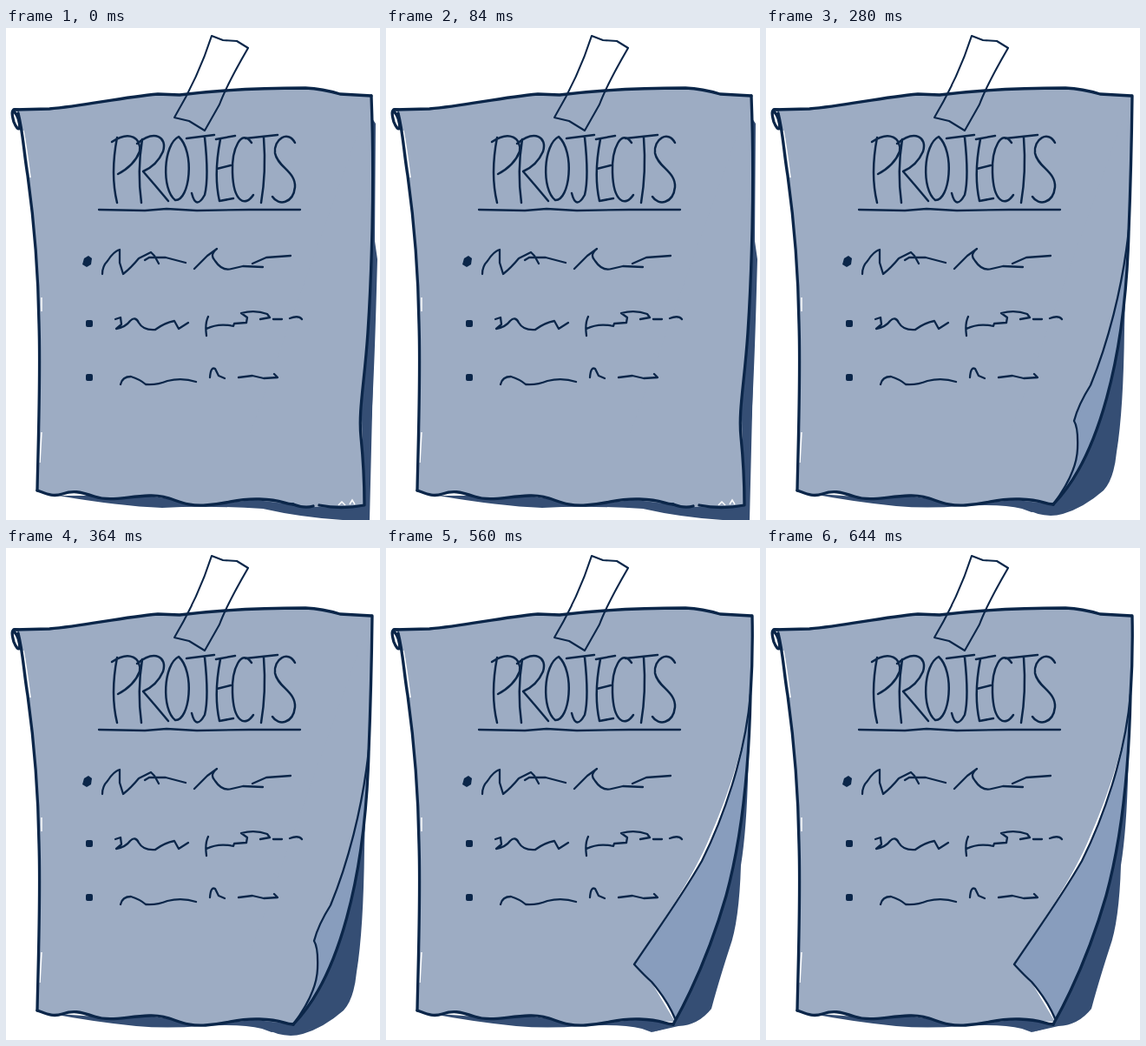
Write an HTML page without scripts that moves like this. It is 431 px wide and 566 px high and loops after 700 ms.

```html
<!DOCTYPE html>
<html lang="en">
<head>
<meta charset="utf-8">
<title>Project note</title>
<style>
  html, body { margin: 0; width: 100%; height: 100%; overflow: hidden; background: #fff; }
  svg { display: block; width: 100%; height: 100%; }
  .ink, .pen, .tape { fill: none; stroke: #0b2649; stroke-linecap: round; stroke-linejoin: round; }
  .ink { stroke-width: 3.3; }
  .pen { stroke-width: 2.3; }
  .tape { stroke-width: 2.1; }
  .letters { stroke-width: 2.5; }
  .dot { fill: #0b2649; }
  .paper { fill: #9dacc3; }
  .shadow { fill: #354e74; }
  .flap { fill: #889dbd; }
  .gap { fill: none; stroke: #fff; stroke-width: 1.5; }
  .pose { visibility: hidden; animation: show 700ms step-end infinite; animation-delay: calc(var(--i) * 140ms - 700ms); }
  @keyframes show { 0% { visibility: visible; } 20%, 100% { visibility: hidden; } }
</style>
</head>
<body>
<svg viewBox="0 0 431 566" role="img" aria-label="A taped note titled Projects, its corner lifting">
  <defs>
    <path id="sheet" class="paper" d="M10 93H50C90 90 130 80 175 76L200 77C240 72 290 69 345 69Q365 70 385 76L421 78V165C413 230 398 275 370 340C345 395 312 438 286 479L305 498L333 545L292 543C270 541 255 546 230 549C200 551 190 538 165 538S122 543 102 539S78 532 65 537S45 535 36 532C36 480 41 400 39 340C38 260 29 205 23 155Q20 122 14 98Z"/>
    <g id="edges">
      <path class="gap" d="M20 118Q24 140 28 172M41 310V326M41 465L39 500"/>
      <path class="ink" d="M9 94L50 93C90 90 130 80 175 76L200 77C240 72 290 69 345 69Q365 70 385 76L421 78"/>
      <path class="ink" d="M14 98C20 122 20 140 25 170C32 220 37 270 38 340C40 400 37 480 36 532"/>
      <path class="ink" d="M14 94C6 92 6 97 9 108Q13 118 16 115Q15 102 10 97"/>
      <path class="ink" d="M36 532C45 535 53 540 65 536S84 533 102 539S138 539 165 538S200 551 230 549S264 541 292 542S318 547 331 548"/>
    </g>
    <path id="under" class="shadow" d="M48 535Q100 545 150 550Q185 553 225 550Q270 547 295 553L306 557L340 548L292 542L230 549L165 538L102 539Z"/>
    <path id="side" class="shadow" d="M422 104L426 110L425 245L428 266C426 340 424 410 420 470L411 475L408 400L418 290Z"/>
  </defs>

  <g class="pose" style="--i:0">
    <use href="#side"/>
    <path class="shadow" d="M409 380L423 400L419 566H388Q340 563 296 553Q230 549 180 552Q130 550 60 538L165 538L230 549L292 542L345 551L412 549Z"/>
    <use href="#sheet"/>
    <path class="paper" d="M421 78C425 180 421 290 417 350S407 440 409 470S413 520 413 549L380 552L345 550L280 542V470Z"/>
    <path class="gap" d="M383 549L387 545L391 549M396 548L399 543L402 548"/>
    <use href="#edges"/>
    <path class="ink" d="M421 78C425 180 421 290 417 350S406 440 409 470S413 520 413 549Q386 554 361 549M331 548Q344 553 354 550"/>
  </g>

  <g class="pose" style="--i:1">
    <use href="#side"/>
    <path class="shadow" d="M405 430L422 400L411 566H385Q340 563 296 553Q230 549 180 552Q130 550 60 538L165 538L230 549L292 542L345 550L403 545Z"/>
    <use href="#sheet"/>
    <path class="paper" d="M421 78C426 180 422 280 416 350S405 490 403 545Q365 551 331 547L280 542V470Z"/>
    <path class="gap" d="M414 350L408 425M350 547L385 544"/>
    <use href="#edges"/>
    <path class="ink" d="M421 78C426 180 422 280 416 350S405 490 403 545Q365 552 331 547"/>
  </g>

  <g class="pose" style="--i:2">
    <use href="#under"/>
    <path class="shadow" d="M416 240L413 345Q412 440 404 488Q401 519 389 532Q366 552 342 559Q320 565 297 552L331 548Q390 440 416 240Z"/>
    <use href="#sheet"/>
    <path class="paper" d="M421 78Q421 160 418 235C414 380 383 495 331 548L280 542V470Z"/>
    <path class="flap" d="M418 232C411 300 393 365 374 411Q360 433 355 452Q360 460 359 484Q358 512 331 548C383 495 414 380 418 235Z"/>
    <use href="#edges"/>
    <path class="ink" d="M422 78Q421 160 418 235C414 380 383 495 331 548"/>
    <path class="pen" d="M418 232C411 300 393 365 374 411Q360 433 355 452Q360 460 359 484Q358 512 331 548"/>
  </g>

  <g class="pose" style="--i:3">
    <use href="#under"/>
    <path class="shadow" d="M417 240Q417 320 411 365Q410 445 400 487Q388 523 361 546Q335 555 306 558L333 548Q396 420 417 240Z"/>
    <use href="#sheet"/>
    <path class="paper" d="M421 78Q421 160 418 235C404 295 384 354 358 405Q333 449 306 483L331 548L280 542V470Z"/>
    <path class="flap" d="M418 235C404 295 384 354 358 405Q333 449 306 483L315 488Q320 514 333 548C380 470 417 365 418 235Z"/>
    <use href="#edges"/>
    <path class="ink" d="M422 78Q421 160 418 235C417 365 380 470 333 548"/>
    <path class="pen" d="M418 235C404 295 384 354 358 405Q333 449 306 483L315 488Q320 514 333 548"/>
  </g>

  <g class="pose" style="--i:4">
    <use href="#under"/>
    <path class="shadow" d="M418 200Q418 310 409 365Q407 430 396 460Q383 500 375 530Q360 549 337 550L306 557L331 548Q396 405 418 200Z"/>
    <use href="#sheet"/>
    <path class="flap" d="M420 168C414 240 388 312 364 360C340 402 312 440 286 479Q298 492 306 499Q324 520 333 545Q369 480 392 400C407 345 418 270 420 170Z"/>
    <use href="#edges"/>
    <path class="ink" d="M422 78Q423 125 420 170C418 270 407 345 392 400Q369 480 331 548"/>
    <path class="pen" d="M420 168C414 240 388 312 364 360C340 402 312 440 286 479Q298 492 306 499Q324 520 333 541"/>
  </g>

  <path class="tape" d="M237 9L250 14L266 15L279 23Q254 66 246 88L229 118L211 107L194 103Q222 56 237 9Z"/>

  <g class="pen letters">
    <path d="M128 126Q120 168 128 201M122 131C143 117 156 127 154 142Q148 158 129 168"/>
    <path d="M157 128Q151 165 156 201M151 133C172 116 186 126 181 142Q174 158 158 165Q172 181 187 199"/>
    <path d="M199 125C181 134 179 186 195 198C212 199 218 142 199 125Z"/>
    <path d="M208 127L240 123M229 126Q234 172 229 192Q219 210 214 190"/>
    <path d="M242 128L264 124M247 128Q239 169 246 199L262 196M243 162L259 158"/>
    <path d="M283 132C271 115 260 139 261 166C262 201 276 206 285 192"/>
    <path d="M276 127L313 123M297 126Q300 166 294 201"/>
    <path d="M333 132C325 117 308 128 310 144C313 160 334 165 333 183C331 202 314 205 307 194"/>
  </g>
  <path class="pen" d="M107 209L160 210L185 208L220 210L280 209L339 209"/>

  <path class="dot" d="M90 265L95 262L99 265L98 272L93 275L88 272Z"/>
  <rect class="dot" x="92" y="336" width="8" height="8" rx="2"/>
  <rect class="dot" x="92" y="398" width="8" height="8" rx="2"/>

  <g class="pen">
    <path d="M111 283Q111 274 117 268Q124 257 131 255L131 270L135 283Q144 276 153 265L167 258L171 262L176 271M160 267L165 264L184 264L207 270"/>
    <path d="M217 277L232 262L243 254Q234 261 241 268Q249 280 260 277L273 274L296 275M284 271L300 264L328 262"/>
    <path d="M126 335L132 333L133 341L127 346Q138 344 143 337Q149 331 153 339Q158 348 172 347Q183 339 194 337L199 346L210 339"/>
    <path d="M233 332Q229 340 231 354M231 346Q245 339 262 343L263 340L277 339L278 333L271 328Q287 324 301 329L304 333L293 335M308 335H318M327 334Q337 330 341 335"/>
    <path d="M132 410Q134 401 144 401Q154 404 161 410Q174 411 186 406Q203 402 219 407M235 402Q236 389 241 392L245 400L252 403M268 402L284 400L297 403L313 402L309 398"/>
  </g>
</svg>
</body>
</html>
```
